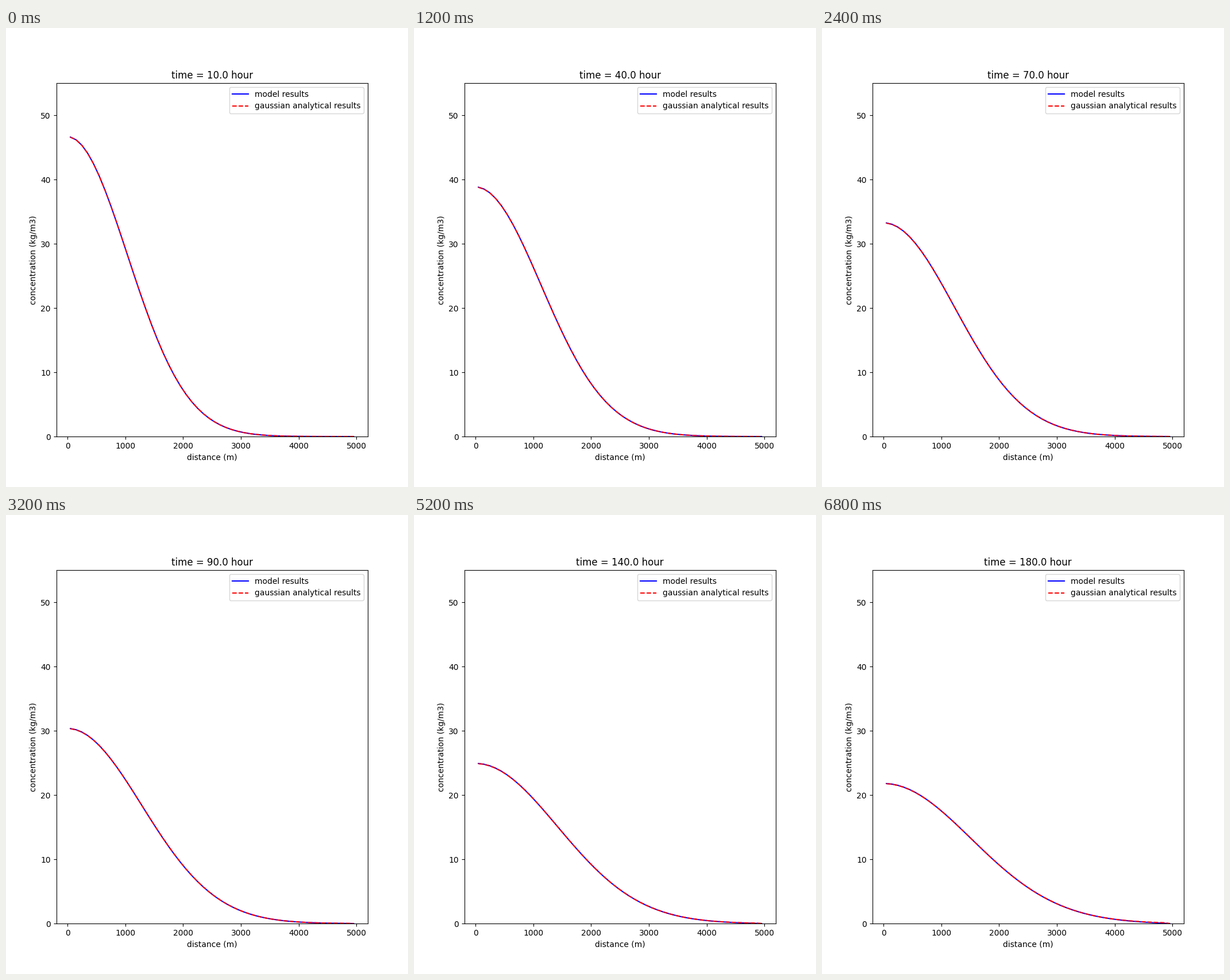
A matplotlib script that plays this animation: 700 px wide and 800 px high, repeating every 7.2 s.

```python
import numpy as np
import matplotlib.pyplot as plt
from matplotlib.animation import FuncAnimation

PEAK = 50.0        # kg/m3 at the centre when time is zero
SIGMA0 = 1000.0    # m, initial spread
D = 1.0            # m2/s, diffusivity
DX = 100.0
DT = 600.0
FRAMES = 18
HOURS_PER_FRAME = 10

r = np.arange(DX / 2, 5000, DX)
faces = np.arange(0, 5001, DX)


def gaussian(hours):
    """Spreading 2D gaussian, held at zero on the outer edge."""
    var = SIGMA0**2 + 2 * D * hours * 3600
    c = PEAK * SIGMA0**2 / var * np.exp(-r**2 / (2 * var))
    c[-1] = 0
    return c


def run_model():
    """Explicit radial diffusion, one profile per frame."""
    c = gaussian(0)
    profiles = []
    for _ in range(FRAMES):
        for _ in range(int(HOURS_PER_FRAME * 3600 / DT)):
            flux = faces[1:-1] * np.diff(c) / DX
            c[1:-1] += D * DT * np.diff(flux) / (r[1:-1] * DX)
            c[0] += D * DT * flux[0] / (r[0] * DX)
        profiles.append(c.copy())
    return profiles


model = run_model()

fig, ax = plt.subplots(figsize=(7, 8), dpi=100)
model_line, = ax.plot(r, model[0], "b-", label="model results")
exact_line, = ax.plot(r, gaussian(HOURS_PER_FRAME), "r--",
                      label="gaussian analytical results")
ax.set_ylim(0, 55)
ax.set_xlabel("distance (m)")
ax.set_ylabel("concentration (kg/m3)")
ax.legend(loc="upper right")
title = ax.set_title("")


def update(i):
    hours = (i + 1) * HOURS_PER_FRAME
    model_line.set_ydata(model[i])
    exact_line.set_ydata(gaussian(hours))
    title.set_text(f"time = {hours:.1f} hour")
    return model_line, exact_line, title


anim = FuncAnimation(fig, update, frames=FRAMES, interval=400, repeat=True)
plt.show()
```
